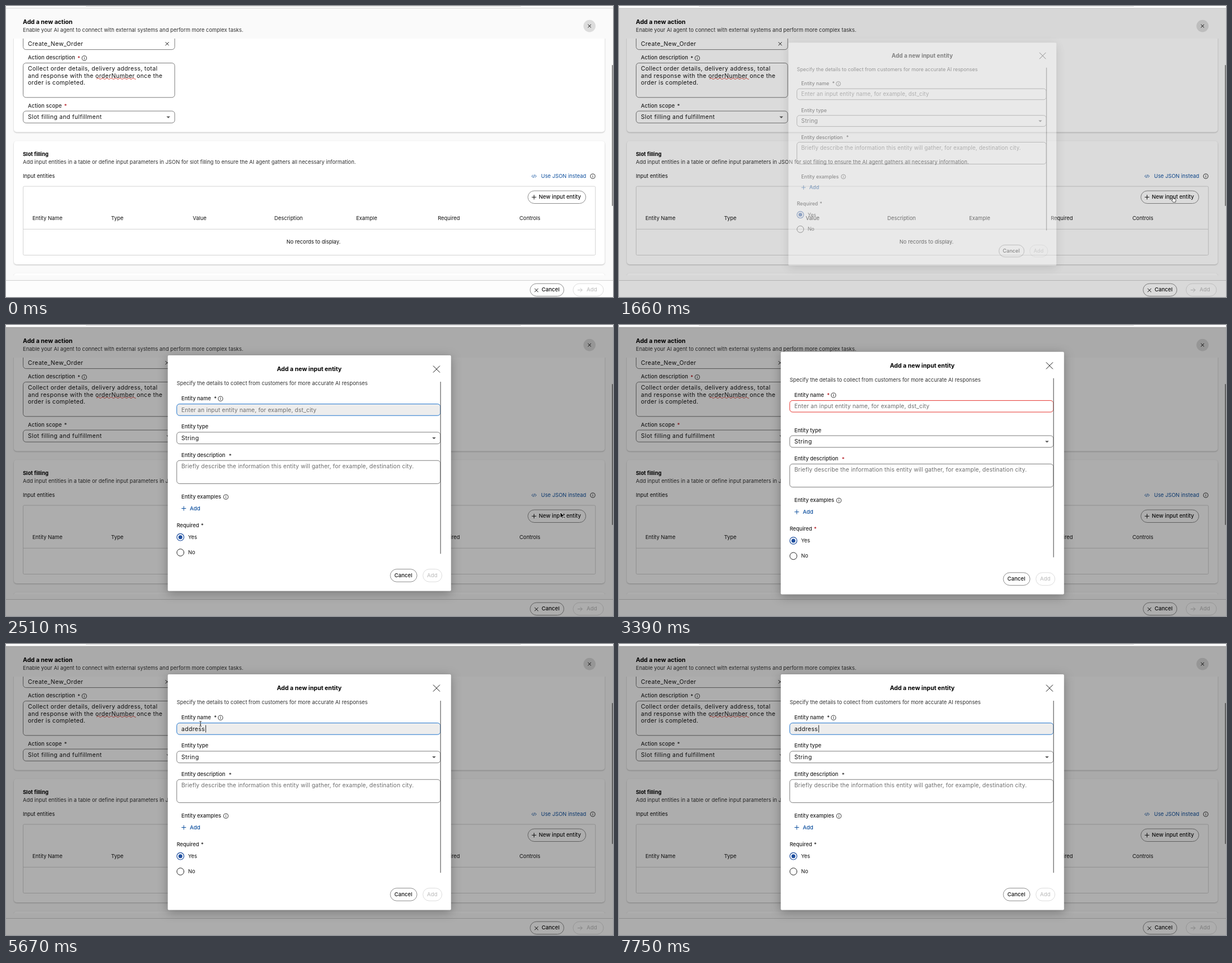
Write an HTML page that moves like this. It is 1080 by 518 pixels and loops after 8000 ms.

```html
<!DOCTYPE html>
<html lang="en">
<head>
<meta charset="utf-8">
<title>Add a new action</title>
<style>
  html, body { margin: 0; width: 100%; height: 100%; overflow: hidden; background: #fff; }
  svg { display: block; width: 100%; height: 100%; }
  text { font: 400 9.33px Inter, sans-serif; fill: #111; white-space: pre; }
  .copy { font-size: 9.39px; fill: #333; }
  .title { font-size: 10.55px; font-weight: 700; fill: #000; }
  .section { font-weight: 700; fill: #000; }
  .label { font-weight: 500; fill: #222; }
  .wide { letter-spacing: .15px; }
  .value { font-size: 10.4px; letter-spacing: .38px; }
  .hint { font-size: 10.2px; letter-spacing: .18px; fill: #6c6c6c; }
  .button { font-size: 9.6px; font-weight: 500; }
  .link { fill: #0d4f9e; }
  .off { fill: #c2c2c2; }
  .star { fill: var(--star); }
  .card { fill: #fff; filter: drop-shadow(0 1px 1.3px rgba(0,0,0,.24)); }
  .field { fill: #fff; stroke: #7b7b7b; }
  .icon { fill: none; stroke: #222; }
</style>
</head>
<body>
<svg id="stage" viewBox="0 0 1080 518"></svg>
<script>
const LOOP = 8000;

const text = (x, y, words, style = '', extra = '') =>
  `<text x="${x}" y="${y}" class="${style}" ${extra}>${words}</text>`;
const box = (x, y, w, h, r, attrs) =>
  `<rect x="${x}" y="${y}" width="${w}" height="${h}" rx="${r}" ${attrs}/>`;
const line = (d, color, width = 1, extra = '') =>
  `<path d="${d}" fill="none" stroke="${color}" stroke-width="${width}" ${extra}/>`;
const field = (x, y, w, h, extra = '') => box(x, y, w, h, 5, `class="field" ${extra}`);
const cross = (x, y, r, width = 1) =>
  line(`M${x - r} ${y - r}l${2 * r} ${2 * r}m0 ${-2 * r}l${-2 * r} ${2 * r}`, '#111', width);
const plus = (x, y, r, color) => line(`M${x - r} ${y}h${2 * r}M${x} ${y - r}v${2 * r}`, color);
const info = (x, y) =>
  `<circle cx="${x}" cy="${y}" r="4.1" class="icon" stroke-width=".9"/>` +
  line(`M${x} ${y - .6}v2.6M${x} ${y - 2.2}v1`, '#222', .9);
const arrow = (x, y) => `<path d="M${x - 3.3} ${y - 1.5}h6.6l-3.3 3.3z" fill="#555"/>`;
const star = (x, y) => text(x, y, '*', 'label star');
const pill = (x, y, w, h, color, extra = '') =>
  box(x, y, w, h, h / 2, `fill="#fff" stroke="${color}" ${extra}`);
const card = (y, h) => box(14, y, 1051.3, h, 5, 'class="card"');

function page() {
  const headers = ['Entity Name', 'Type', 'Value', 'Description', 'Example', 'Required', 'Controls'];
  const columns = headers.map((name, i) =>
    text(i ? 187 + (i - 1) * 145.3 : 47, 381, name)).join('');
  let squiggle = 'M161 130.2';
  for (let i = 0; i < 18; i++) squiggle += `l2 ${i % 2 ? 1.6 : -1.6}l2 0`.replace('l2 0', 'h1.9');

  return box(0, 4, 1080, 514, 0, 'fill="#fafafa"') +
    line('M142 .4H916', '#d4d4d4') + line('M0 3.8H1080', '#d2d2d2') +
    `<g clip-path="url(#scrollArea)">` +
      card(30, 194.5) + card(240.2, 219.8) + card(475.8, 60) +
      field(30.5, 40, 269.7, 37.6) + text(39, 70.5, 'Create_New_Order', 'value') +
      cross(286.7, 67.3, 3) +
      text(39, 95.3, 'Action description', 'label wide') + star(127.3, 96) + info(139.3, 92.8) +
      field(30.5, 101.5, 269.7, 61.3) +
      text(39, 115.4, 'Collect order details, delivery address, total', 'value') +
      text(39, 127.5, 'and response with the orderNumber once the', 'value') +
      text(39, 139.6, 'order is completed.', 'value') +
      line(squiggle, '#e0382f', .9) +
      text(39, 180.6, 'Action scope', 'label wide') + star(103.5, 181.3) +
      field(30.5, 187, 269.7, 21.2) + text(39, 201, 'Slot filling and fulfillment', 'value') +
      arrow(288.8, 198) +
      text(30, 266.6, 'Slot filling', 'section') +
      text(30, 280.8, 'Add input entities in a table or define input parameters in JSON for slot filling to ensure the AI agent gathers all necessary information.', 'copy') +
      text(30, 306.2, 'Input entities') +
      line('M937.8 300.8l-2.4 2.2 2.4 2.2M941.2 300.8l2.4 2.2-2.4 2.2M940.3 300.2l-1.6 5.6', '#0d4f9e', .9) +
      text(952, 306.2, 'Use JSON instead', 'link') + info(1044, 303) +
      box(30.5, 321, 1018.2, 122.5, 2, 'fill="none" stroke="#d3d3d3"') +
      line('M30.5 397.3H1048.7', '#d3d3d3') +
      pill(928.6, 329, 103, 22.5, '#8c8c8c', 'id="newEntity"') +
      plus(939.5, 340.3, 4, '#111') + text(948, 343.4, 'New input entity', 'button') +
      columns + text(499, 423, 'No records to display.') +
    `</g>` +
    text(30, 32.3, 'Add a new action', 'title') +
    text(30, 46.4, 'Enable your AI agent to connect with external systems and perform more complex tasks.', 'copy') +
    `<circle cx="1038.2" cy="35.6" r="10.8" fill="#dcdcdc"/>` + cross(1038.2, 35.6, 2.8) +
    box(0, 488, 1080, 30, 0, 'fill="#fdfdfd"') + line('M0 488.5H1080', '#d0d0d0') +
    pill(932.6, 494.2, 60, 22.3, '#8c8c8c') + cross(943.7, 506, 3.2) +
    text(953, 508.4, 'Cancel', 'button') +
    pill(1009, 494.2, 54, 22.3, '#dcdcdc') +
    line('M1017 505.6h8.2m-3.5-3.5l3.5 3.5-3.5 3.5', '#c2c2c2') +
    text(1033, 508.4, 'Add', 'button off') +
    box(1078.2, 105, 1.5, 251, .7, 'fill="#6b6b6b"');
}

function dialog() {
  return `<rect id="sheet" x="287.8" width="504" rx="2" fill="#fff" style="filter:drop-shadow(0 4px 9px rgba(0,0,0,.3))"/>` +
    `<g id="upper">` +
      text(539.5, 81.8, 'Add a new input entity', 'title', 'text-anchor="middle"') +
      cross(766, 78.6, 6) +
      text(303.7, 107.3, 'Specify the details to collect from customers for more accurate AI responses', 'copy') +
      text(312, 133.8, 'Entity name', 'label') + star(370, 134.4) + info(381.7, 131.2) +
      field(303.8, 140.6, 469, 20.6, 'id="nameField"') +
      text(312, 154.5, 'Enter an input entity name, for example, dst_city', 'hint', 'id="nameHint"') +
      text(312, 154.7, 'address', 'value', 'id="nameValue"') +
      `<path id="caret" d="M0 144.5v13" stroke="#111" stroke-width=".9"/>` +
    `</g><g id="lower">` +
      text(312, 184.4, 'Entity type', 'label') +
      field(303.8, 190.8, 469, 20.8) + text(312, 204.9, 'String', 'value') + arrow(761.5, 201.5) +
      text(312, 235, 'Entity description', 'label') + star(396.6, 235.5) +
      field(303.8, 241.2, 469, 41.2) +
      text(312, 255.3, 'Briefly describe the information this entity will gather, for example, destination city.', 'hint') +
      text(312, 309.3, 'Entity examples', 'label') + info(391.2, 306.1) +
      plus(316.3, 326.5, 4, '#0d4f9e') + text(327, 329.8, 'Add', 'button link') +
      text(303.7, 359.8, 'Required', 'label') + star(346.7, 360.3) +
      `<circle cx="310.3" cy="377.7" r="6.3" class="icon" style="stroke:#1f4f9f" stroke-width="1.2"/>` +
      `<circle cx="310.3" cy="377.7" r="3.5" fill="#1f4f9f"/>` + text(324, 381, 'Yes') +
      `<circle cx="310.3" cy="405" r="6.3" class="icon" stroke-width="1"/>` + text(324, 407.9, 'No') +
      pill(683.8, 434.6, 47.4, 22.6, '#8c8c8c') + text(691, 449, 'Cancel', 'button') +
      pill(741.8, 434.6, 33.8, 22.6, '#dcdcdc') + text(749, 449, 'Add', 'button off') +
    `</g><path id="dialogScroll" stroke="#777" stroke-width="1.4"/>`;
}

const pointers =
  `<g id="arrowPointer"><path d="M0 0v10.6l2.5-2.3 1.7 3.8 1.8-.8-1.7-3.7h3.4z" fill="#111" stroke="#fff" stroke-width=".8"/></g>` +
  `<g id="handPointer"><path d="M1.2 .8q1-.9 1.5.3l.6 3.5 3.5 1q1.4.5 1.1 2l-.7 3.6H2.8L.1 7.7q-.4-1.2.9-.9l.8.8z" fill="#fff" stroke="#222" stroke-width=".8"/></g>` +
  `<g id="textPointer"><path d="M-2-4.6q2 0 2 1.2v6.8q0 1.2-2 1.2M2-4.6q-2 0-2 1.2M2 4.6q-2 0-2-1.2M-1 1.8h2" fill="none" stroke="#222" stroke-width=".9"/></g>`;

document.getElementById('stage').innerHTML =
  `<clipPath id="scrollArea"><rect y="58" width="1080" height="421.5"/></clipPath>` + page() +
  `<rect id="shade" y="4" width="1080" height="514"/><g id="dialog">${dialog()}</g>` + pointers;

const $ = id => document.getElementById(id);
const set = (id, attrs) => { for (const k in attrs) $(id).setAttribute(k, attrs[k]); };
const show = (id, on) => set(id, { visibility: on ? 'visible' : 'hidden' });
const within = (t, a, b) => t >= a && t < b;

// Opening steps: start, shade opacity, dialog opacity, dialog scale
const opening = [
  [0, 0, 0, .9], [1660, .14, .4, .946], [1720, .26, .88, .995], [1790, .3, 1, 1], [1850, .32, 1, 1]
];

// Pointer moves: start, end, from x, y, to x, y
const moves = [
  [200, 750, 1074, 490, 978, 307], [890, 960, 978, 307, 983, 338],
  [2510, 2511, 983, 338, 986, 333], [4870, 5460, 294, 386, 346, 136],
  [5670, 5671, 346, 136, 346, 142], [6000, 6420, 346, 142, 1026, 204],
  [6950, 7700, 1026, 204, 1043, 247]
];

function pointerAt(t) {
  const [start, end, x0, y0, x1, y1] = moves.filter(m => t >= m[0]).pop() || moves[0];
  const p = Math.min(1, Math.max(0, (t - start) / (end - start)));
  const e = 1 - (1 - p) ** 2;
  return [x0 + (x1 - x0) * e, y0 + (y1 - y0) * e];
}

function drawPointer(t) {
  const [x, y] = pointerAt(t);
  const visible = within(t, 200, 2580) || within(t, 4870, 7750);
  const kind = within(t, 1100, 2510) ? 'hand'
    : within(t, 5300, 6070) ? 'text' : 'arrow';
  for (const name of ['arrow', 'hand', 'text']) {
    show(name + 'Pointer', visible && kind === name);
    set(name + 'Pointer', { transform: `translate(${x} ${y})` });
  }
}

function drawDialog(t) {
  const [, shade, opacity, scale] = opening.filter(step => t >= step[0]).pop();
  const error = within(t, 3390, 5670);
  const focused = within(t, 1850, 3390) || t >= 5530;
  const typed = t >= 5670;
  const grow = error ? 6.2 : 0;

  set('shade', { opacity: shade });
  show('dialog', opacity > 0);
  set('dialog', {
    opacity,
    transform: `translate(539.8 263.6) scale(${scale}) translate(-539.8 -263.6)`
  });
  set('sheet', { y: 54 - grow, height: 419.4 + 2 * grow });
  set('upper', { transform: `translate(0 ${-grow})` });
  set('lower', { transform: `translate(0 ${grow})` });
  set('dialogScroll', { d: `M773.2 ${101 - grow}V${407.3 + grow}` });

  $('nameField').style.stroke = focused ? '#2176cf' : error ? '#e5332d' : '';
  $('nameField').style.fill = focused ? '#ededed' : '';
  show('nameHint', opacity > 0 && !typed);
  show('nameValue', typed);
  const caretOn = typed ? Math.floor((t - 5640) / 525) % 2 === 0
    : focused && !within(t, 2310, 2920);
  show('caret', caretOn);
  set('caret', { transform: `translate(${typed ? 355.4 : 312.5} 0)` });
}

function draw(now) {
  const t = now % LOOP;
  const darkStar = within(t, 1660, 3390) || t >= 5670;
  $('stage').style.setProperty('--star', darkStar ? '#222' : '#b3141c');
  $('newEntity').style.fill = within(t, 1135, 1660) ? '#ebebeb' : '';
  drawDialog(t);
  drawPointer(t);
}

const began = performance.now();
function tick() {
  draw(performance.now() - began);
  requestAnimationFrame(tick);
}
tick();
</script>
</body>
</html>
```
